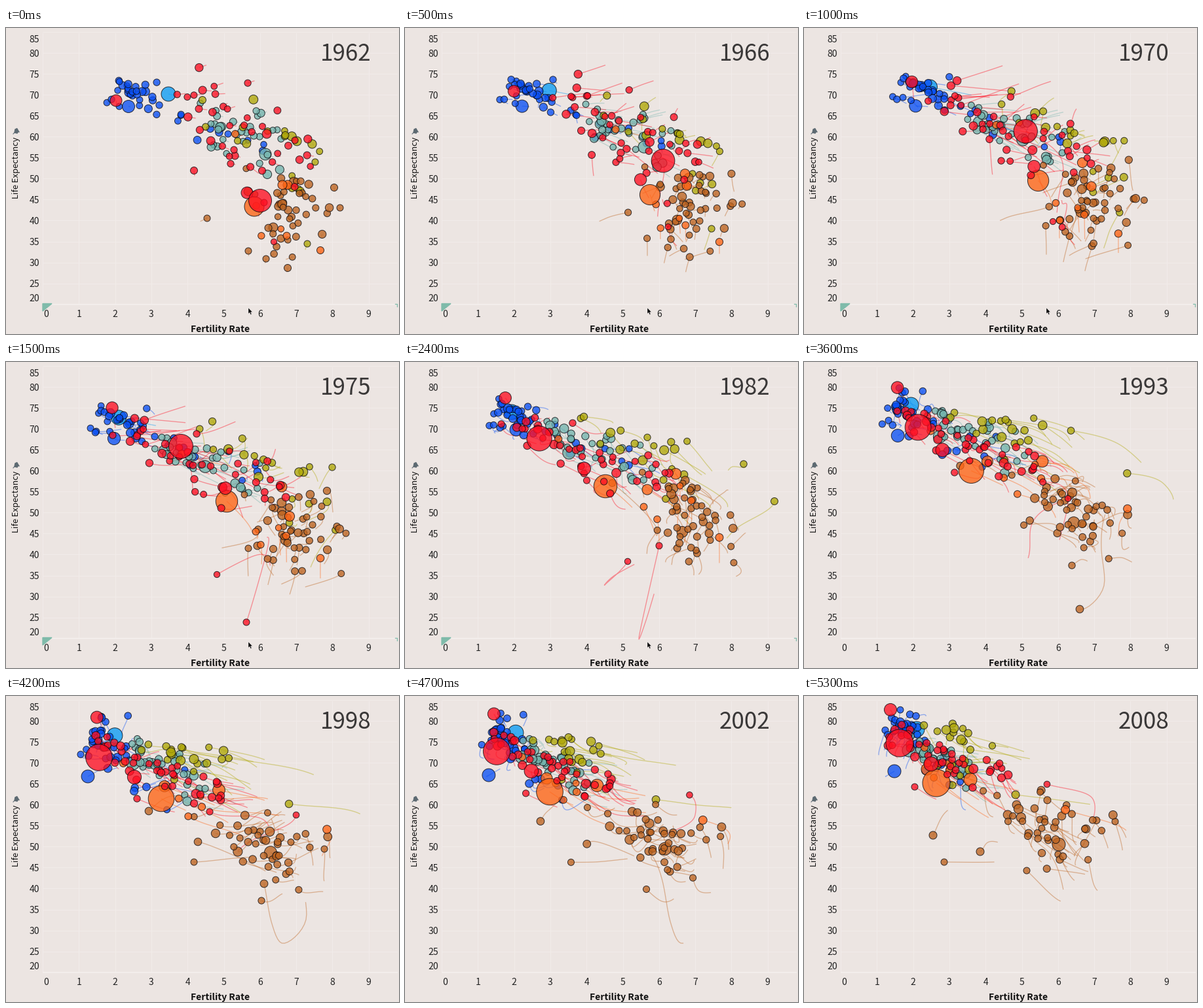
Animation of 600x468 px, one loop 5.4 s. Source, as a matplotlib script:

```python
import matplotlib.pyplot as plt
import numpy as np
from matplotlib.animation import FuncAnimation
from matplotlib.collections import LineCollection
from matplotlib.patches import Polygon

W, H, DPI = 600, 468, 100
FRAMES, STEP_MS = 54, 100
PX = 72 / DPI                      # points per pixel
LEAD, SUB, TAIL = 2, 2, 23         # run-in frames, samples per frame, trail samples

BG, INK = "#ece5e2", "#222222"
BLUE, SKY, TEAL, OLIVE = "#0a50f5", "#0a9df5", "#74b5ae", "#b0a808"
BROWN, ORANGE, RED = "#bd6420", "#ff6414", "#ff0f22"

FULL = [0, 5, 15, 24, 29, 42, 53]
MAIN = [0, 15, 29, 42, 53]
FEW = [0, 15, 29, 53]
CLOCK = np.linspace(-LEAD, FRAMES - 1, SUB * (FRAMES - 1 + LEAD) + 1)

rng = np.random.default_rng(7)
paths, radii, colors = [], [], []


def hermite(keys, pts):
    """Smooth path through complex points, sampled on CLOCK."""
    keys, pts = np.array(keys, float), np.array(pts)
    slope = np.gradient(pts, keys)
    i = np.clip(np.searchsorted(keys, CLOCK, "right") - 1, 0, len(keys) - 2)
    h = keys[i + 1] - keys[i]
    u = (CLOCK - keys[i]) / h
    curve = ((2*u**3 - 3*u**2 + 1) * pts[i] + (u**3 - 2*u**2 + u) * h * slope[i]
             + (3*u**2 - 2*u**3) * pts[i + 1] + (u**3 - u**2) * h * slope[i + 1])
    return np.where(CLOCK < keys[0], pts[0] + slope[0] * (CLOCK - keys[0]), curve)


def track(color, r0, r1, keys, *pts):
    """One bubble through pts at the key frames, radius growing from r0 to r1."""
    paths.append(hermite(keys, pts))
    radii.append((r0, r1))
    colors.append(color)


def crowd(color, count, lean, *clouds):
    """Small bubbles scattered along a line that moves from cloud to cloud.

    Each cloud holds the ends of its line and the spread around it;
    lean above 1 gathers the bubbles at the first end.
    """
    along = rng.permutation((np.arange(count) + 0.5) / count) ** lean
    own = rng.normal(size=(2, count))
    for k in range(count):
        pts = []
        for a, b, spread in clouds:
            g = np.clip(0.85 * own[:, k] + 0.5 * rng.normal(size=2), -2, 2)
            pts.append(a + (b - a) * along[k] + g[0] * spread.real + 1j * g[1] * spread.imag)
        r = 4.7 + min(rng.exponential(0.7), 2.2)
        track(color, r, r + 0.2, MAIN, *pts)


# Widely spread regions first, the largest bubbles last (on top).
track(SKY, 11, 12, FEW, 248+101j, 172+85j, 163+72j, 172+51j)
track(BLUE, 9.5, 10, MAIN, 187+120j, 165+117j, 168+100j, 125+123j, 138+115j)
crowd(BLUE, 40, 4.5,
      (188+101j, 425+190j, 17+13j), (165+92j, 405+165j, 18+14j),
      (155+80j, 340+140j, 15+15j), (146+72j, 275+140j, 16+24j),
      (152+49j, 255+125j, 14+14j))

track(TEAL, 9, 10, MAIN, 396+193j, 304+160j, 226+128j, 194+103j, 160+83j)
crowd(TEAL, 32, 0.9,
      (425+200j, 290+130j, 20+26j), (392+195j, 215+112j, 18+16j),
      (365+160j, 195+80j, 14+18j), (305+145j, 185+78j, 12+18j),
      (255+125j, 162+66j, 12+12j))

track(OLIVE, 5, 6, MAIN, 460+330j, 503+257j, 549+186j, 432+165j, 323+151j)
paths[-1] = hermite(FULL, [460+330j, 468+307j, 503+257j, 564+213j, 549+186j,
                           432+165j, 323+151j])
track(OLIVE, 5, 5.5, [0, 15, 24, 29, 42, 53],
      472+205j, 498+161j, 517+156j, 483+127j, 340+95j, 254+82j)
crowd(OLIVE, 18, 2,
      (462+232j, 290+110j, 24+34j), (452+200j, 270+100j, 34+24j),
      (385+142j, 245+90j, 26+24j), (285+105j, 215+80j, 40+14j),
      (232+100j, 212+65j, 34+25j))

track(BROWN, 7, 10, FEW, 408+305j, 427+272j, 419+254j, 389+227j)
track(BROWN, 5.5, 6, [0, 15, 29, 32, 36, 39, 42, 53],
      501+244j, 490+197j, 454+287j, 458+342j, 421+378j, 405+345j, 394+287j, 343+210j)
track(BROWN, 5, 6, MAIN, 307+291j, 385+256j, 273+156j, 218+176j, 197+213j)
track(BROWN, 5.5, 5, MAIN, 430+367j, 441+320j, 425+302j, 390+313j, 340+267j)
track(BROWN, 5, 5, MAIN, 510+275j, 519+262j, 487+286j, 486+234j, 475+192j)
track(BROWN, 5, 5, MAIN, 370+341j, 370+285j, 381+248j, 287+254j, 214+254j)
track(BROWN, 5, 6, MAIN, 397+353j, 408+303j, 405+273j, 293+223j, 269+238j)
crowd(BROWN, 41, 1,
      (423+232j, 438+322j, 29+17j), (428+205j, 446+300j, 33+15j),
      (398+170j, 452+278j, 26+15j), (345+192j, 438+258j, 34+20j),
      (315+168j, 430+225j, 30+22j))

track(ORANGE, 7, 10, MAIN, 430+240j, 421+191j, 401+162j, 325+144j, 254+128j)
track(ORANGE, 7, 9, MAIN, 422+240j, 433+236j, 329+172j, 242+138j, 188+112j)
track(ORANGE, 5.5, 6.5, MAIN, 480+340j, 480+300j, 481+250j, 490+204j, 399+174j)
track(ORANGE, 5.5, 5.5, MAIN, 350+162j, 268+140j, 218+108j, 179+103j, 184+79j)
crowd(ORANGE, 4, 1,
      (390+270j, 440+340j, 12+12j), (385+260j, 435+280j, 12+12j),
      (360+200j, 420+190j, 15+15j), (285+160j, 300+180j, 12+12j),
      (195+105j, 235+120j, 10+10j))

track(ORANGE, 15, 21, FULL, 379+273j, 374+255j, 337+213j, 306+190j, 281+178j,
      237+157j, 202+133j)
track(RED, 5, 5, [0, 9, 15, 18, 24, 29, 42, 53],
      394+267j, 398+290j, 367+398j, 357+424j, 388+281j, 403+212j, 311+177j, 229+119j)
track(RED, 4.6, 4.8, [0, 10, 15, 20, 24, 29, 42, 46, 53],
      409+327j, 380+296j, 322+325j, 306+340j, 340+305j, 347+250j, 443+182j, 440+156j,
      371+135j)
track(RED, 5.5, 5, MAIN, 287+218j, 280+156j, 263+178j, 200+157j, 169+139j)
crowd(RED, 38, 1.2,
      (425+195j, 275+105j, 27+34j), (390+195j, 165+92j, 32+24j),
      (362+172j, 150+74j, 18+17j), (318+158j, 130+58j, 14+16j),
      (290+122j, 122+45j, 14+17j))
track(RED, 9, 9.5, FEW, 168+111j, 162+70j, 148+48j, 132+21j)
track(RED, 9, 11, MAIN, 368+252j, 335+193j, 241+149j, 196+124j, 194+104j)
track(RED, 17.5, 21, FULL, 388+264j, 394+203j, 267+129j, 205+117j, 209+107j,
      142+94j, 146+72j)

paths = np.array(paths)
xy = np.stack([paths.real, paths.imag], axis=-1)
radii = np.array(radii)

fig = plt.figure(figsize=(W / DPI, H / DPI), dpi=DPI, facecolor=BG)
ax = fig.add_axes([0, 0, 1, 1])
ax.set(xlim=(0, W), ylim=(H, 0))
ax.axis("off")


def label(x, y, text, size, **style):
    opts = dict(family="Noto Sans CJK JP", color=INK, ha="center", va="center_baseline")
    return ax.text(x, y, text, fontsize=size * PX, **{**opts, **style})


# Grid and axis labels
for k in range(10):
    x = 56 + 55.3 * k
    ax.plot([x, x], [8, 421], color="#f1ebe9", lw=0.8, zorder=0)
    label(61 if k == 0 else x, 436, str(k), 14)
for k in range(14):
    y = 6 + 32.05 * k
    ax.plot([56, 597], [y, y], color="#f1ebe9", lw=0.8, zorder=0)
    label(51, min(max(y, 16), 412), str(85 - 5 * k), 14, ha="right")
ax.plot([56, 597], [421.5, 421.5], color="#f4f0ee", lw=0.9, zorder=0)
label(327, 459, "Fertility Rate", 14, weight="bold", color="#111111")
label(16, 214, "Life Expectancy", 13, weight="medium", color="#111111",
      rotation=90, va="center")

# Pin beside the vertical title
ax.add_patch(Polygon([(14, 155), (17, 154), (19, 158), (17, 161), (13, 160)], color="#5d6a72"))
ax.plot([11, 14.5], [162, 158.5], color="#5d6a72", lw=0.8)
ax.plot([16, 20], [154, 159], color="#5d6a72", lw=1)

# Corner marks
corner = [
    ax.add_patch(Polygon([(56, 421.5), (70, 421.5), (56, 433)], color="#7fbbaa")),
    ax.plot([593.5, 596.5, 596.5], [422, 422, 426], color="#7fbbaa", lw=0.9)[0],
]

trails = LineCollection([], colors=colors, linewidths=0.95, alpha=0.42, zorder=2)
ax.add_collection(trails)
dots = ax.scatter(*xy[:, 0].T, c=colors, alpha=0.78, zorder=3)
dots.set_edgecolor((0.03, 0.03, 0.05, 0.9))
dots.set_linewidth(0.72)

year = label(519, 36, "1962", 35, weight="light", color="#3a3838", zorder=5)
ARROW = np.array([(0, 0), (0, 9), (2, 7.2), (3.5, 10.5), (5, 9.8), (3.6, 6.7), (6.2, 6.5)])
cursor = ax.add_patch(Polygon(ARROW, facecolor="black", edgecolor="#f4f0ee",
                              lw=0.3, zorder=6))


def draw(f):
    i = SUB * (f + LEAD)
    dots.set_offsets(xy[:, i])
    r = radii[:, 0] + (radii[:, 1] - radii[:, 0]) * f / (FRAMES - 1)
    dots.set_sizes((2 * r * PX) ** 2)
    trails.set_segments(list(xy[:, max(0, i - TAIL):i + 1]))

    years = [1962, 1966.3, 1975.1, 1982.6, 1988, 1998.5, 2008]
    year.set_text(str(int(np.interp(f, FULL, years))))

    u = np.clip((f - 24) / 4, 0, 1)
    u = u * u * (3 - 2 * u)
    cursor.set_xy(ARROW + (370 - 69 * u, 428 - 416 * u))
    cursor.set_visible(f <= 30)
    for mark in corner:
        mark.set_visible(f <= 24)
    return [dots, trails, year, cursor, *corner]


anim = FuncAnimation(fig, draw, frames=FRAMES, interval=STEP_MS, repeat=True,
                     repeat_delay=0, init_func=lambda: draw(0))
plt.show()
```
